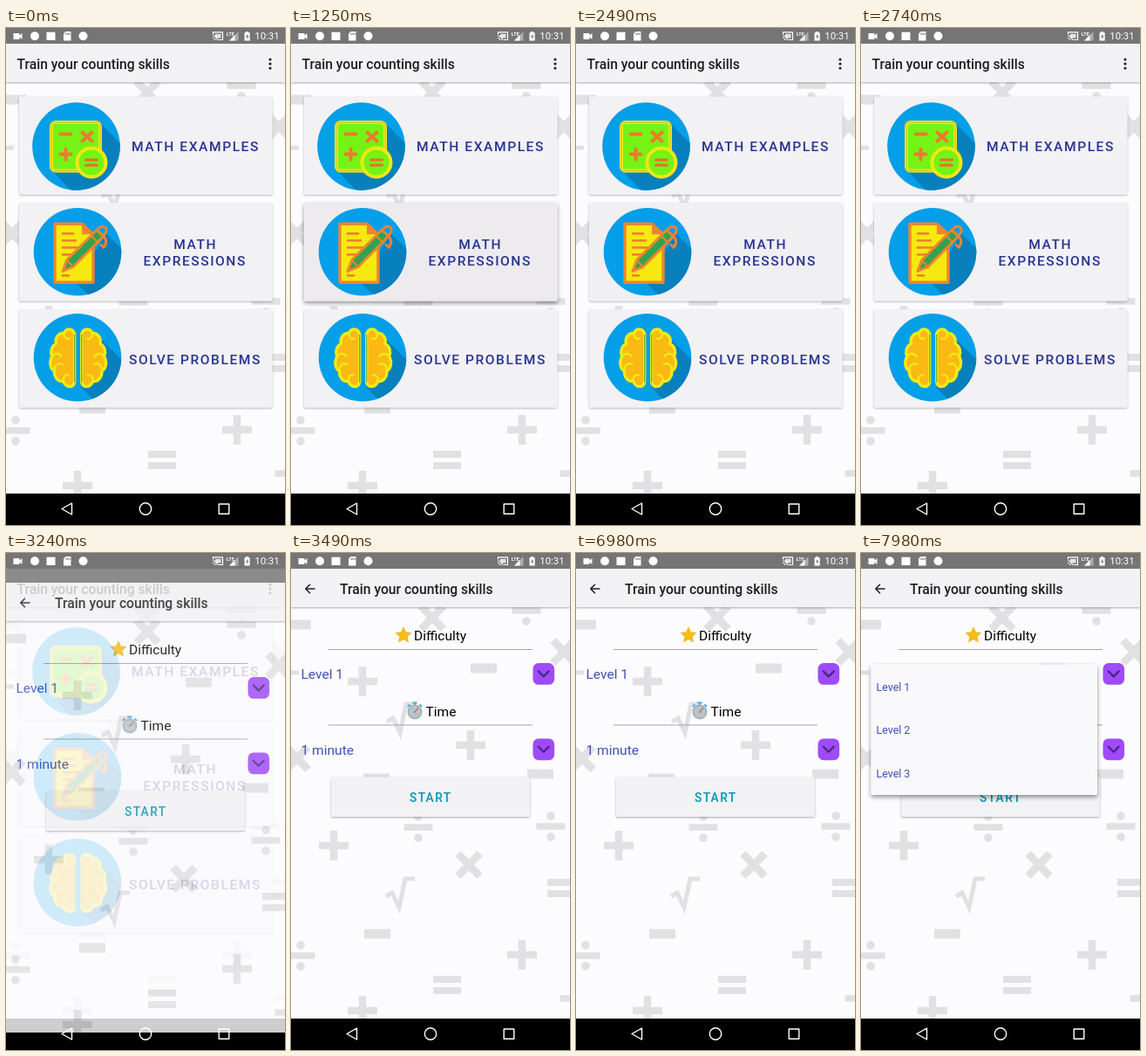
Recreate the animation shown at these times as an HTML page. Size 320x569 px, loop 8 s.

```html
<!DOCTYPE html>
<html lang="en">
<head>
<meta charset="utf-8">
<title>Counting skills</title>
<style>
html, body { margin: 0; width: 100%; height: 100%; overflow: hidden; background: #000; }
svg { display: block; width: 100%; height: 100%; }
text { font-family: Roboto, "Noto Sans", sans-serif; font-size: 15.56px; }
.title { font-weight: 500; font-size: 15.66px; fill: #1f1f1f; }
.caps { font-weight: 500; letter-spacing: .1em; fill: #283593; }
.start { font-weight: 500; font-size: 13.75px; letter-spacing: .1em; fill: #0095b6; }
.choice { fill: #3f51b5; }
.small { font-size: 12.45px; }
.line { stroke-linecap: round; stroke-linejoin: round; }
</style>
</head>
<body>
<svg id="stage" viewBox="0 0 320 569" preserveAspectRatio="none">
  <defs>
    <clipPath id="content"><rect y="18" width="320" height="515"/></clipPath>
    <filter id="low" x="-10%" y="-20%" width="120%" height="150%">
      <feDropShadow dx="0" dy="1" stdDeviation="1" flood-opacity=".32"/>
    </filter>
    <filter id="high" x="-10%" y="-20%" width="120%" height="150%">
      <feDropShadow dx="0" dy="2.5" stdDeviation="2.6" flood-opacity=".42"/>
    </filter>
    <clipPath id="disc"><circle r="50.3"/></clipPath>

    <g id="plus"><path d="M-17 0H17M0-17V17"/></g>
    <g id="minus"><path d="M-15 0H15"/></g>
    <g id="equals"><path d="M-16-6H16M-16 7H16"/></g>
    <g id="times"><path d="M-12.5-13L12.5 13M12.5-13L-12.5 13"/></g>
    <g id="divide"><path d="M-16.5 0H16.5"/><circle cy="-12" r="4.8" stroke="none"/><circle cy="12" r="4.8" stroke="none"/></g>
    <g id="root"><path d="M-17 3L-10-1L-2 16L5-17H16" fill="none"/></g>

    <g id="pattern" fill="#e1e0e2"></g>

    <rect id="bar" y="18" width="320" height="44" fill="#f2f1f3" filter="url(#low)"/>

    <g id="dropdown">
      <rect x="-12.2" y="-12.4" width="24.6" height="24.8" rx="6.5" fill="#9f4bfa"/>
      <path class="line" d="M-6-3L0 3L6-3" fill="none" stroke="#4b2388" stroke-width="2.3"/>
    </g>

    <g id="half" class="line" fill="none">
      <path d="M-4-27C-6-34-14-34-16-28C-23-28-27-22-25-16C-31-13-32-6-30-1C-34 6-31 14-27 15C-28 22-23 28-17 27C-14 35-5 35-4 28Z"
        fill="#fbb913" stroke="#f0ea16" stroke-width="3.4"/>
      <path d="M-16-28C-17-23-13-20-10-22M-30-1C-27-6-21-5-19-1M-27 15C-28 9-22 5-18 8M-17 27C-18 22-14 19-11 20"
        stroke="#f0ea16" stroke-width="2.2"/>
      <path d="M-4-26V28" stroke="#58ad45" stroke-width="1.2"/>
    </g>
  </defs>

  <rect width="320" height="569"/>

  <g id="menu" clip-path="url(#content)">
    <rect y="18" width="320" height="515" fill="#fcfbfd"/>
    <use href="#pattern"/>
    <use href="#bar"/>
    <text class="title" x="12.4" y="46.5">Train your counting skills</text>
    <g fill="#222"><circle cx="303" cy="36" r="1.6"/><circle cx="303" cy="41" r="1.6"/><circle cx="303" cy="46" r="1.6"/></g>

    <rect x="15" y="78.5" width="290.5" height="112" rx="1.5" fill="#f2f1f3" filter="url(#low)"/>
    <rect id="card" x="15" y="200" width="290.5" height="112.5" rx="1.5"/>
    <rect x="15" y="322" width="290.5" height="112.5" rx="1.5" fill="#f2f1f3" filter="url(#low)"/>

    <g transform="translate(80.5 135.5)">
      <circle r="50.3" fill="#049fe8"/>
      <path d="M27-27L70 16V70H12L-27 28Z" fill="#0880bd" clip-path="url(#disc)"/>
      <rect x="-28.5" y="-27.5" width="56" height="55.5" rx="5" fill="#75f314" stroke="#f1e712" stroke-width="4"/>
      <rect x="-28.5" y="-27.5" width="56" height="55.5" rx="5" fill="none" stroke="#c9bd32" stroke-width="1"/>
      <path class="line" d="M-18-14H-6M7-16L18-6M18-16L7-6M-18 9H-6M-12 3V15" stroke="#ee7a2e" stroke-width="4"/>
      <circle cx="17.5" cy="18.5" r="16.5" fill="#75f314" stroke="#f1e712" stroke-width="4"/>
      <path class="line" d="M11 15.5H24M11 21.5H24" stroke="#ee6c31" stroke-width="3"/>
    </g>

    <g transform="translate(82 256.3)">
      <circle r="50.3" fill="#049fe8"/>
      <path d="M33-21L75 21V70H33L-2 35Z" fill="#0880bd" clip-path="url(#disc)"/>
      <path class="line" d="M-26-32H5L18-20V35H-26Z" fill="#f5e90f" stroke="#ee8430" stroke-width="3.4"/>
      <path d="M5-32V-20H18Z" fill="#ee8430"/>
      <path class="line" d="M-17-21H-5M-17-13H-2M-17-5H5M-17 3H-4M-17 27H-10" stroke="#ee8430" stroke-width="2.7"/>
      <path class="line" d="M-17 22L-12 9L22-25L30-18L-5 17Z" fill="#31a34e" stroke="#ee8430" stroke-width="3"/>
      <path class="line" d="M22-25L27-29Q34-30 33-23L30-18M29-18Q36-13 30-5L27-8" fill="none" stroke="#ee8430" stroke-width="3"/>
      <path class="line" d="M-11 11L-7 15M16-18L23-11" stroke="#ee8430" stroke-width="2"/>
    </g>

    <g transform="translate(82 377.3)">
      <circle r="50.3" fill="#049fe8"/>
      <path d="M22-26L75 27V70H40L4 34Z" fill="#0880bd" clip-path="url(#disc)"/>
      <g transform="translate(.7 0)"><use href="#half"/><use href="#half" transform="scale(-1 1)"/></g>
    </g>

    <text class="caps" x="144" y="141">MATH EXAMPLES</text>
    <text class="caps" x="192.2" y="253">MATH</text>
    <text class="caps" x="157.4" y="271.5">EXPRESSIONS</text>
    <text class="caps" x="141" y="384.5">SOLVE PROBLEMS</text>
  </g>

  <g id="setup">
    <rect width="320" height="18" fill="#757575"/>
    <g clip-path="url(#content)">
      <rect y="18" width="320" height="515" fill="#fcfbfd"/>
      <use href="#pattern"/>
      <use href="#bar"/>
      <path class="line" d="M27 41H17M21.5 36.3L16.8 41L21.5 45.7" fill="none" stroke="#222" stroke-width="1.6"/>
      <text class="title" x="56" y="46.5">Train your counting skills</text>

      <path d="M43 110.5H277M43 197H277" stroke="#a5a4a6" stroke-width="1"/>
      <path id="star" fill="#f6bd16" stroke="#e9a916" stroke-width=".6" stroke-linejoin="round"/>
      <text x="141" y="100">Difficulty</text>
      <path class="line" d="M142 171.5V174M140 171.5H144M148 174L149.5 175.5M136 174L134.5 175.5" stroke="#4caedc" stroke-width="2"/>
      <circle cx="142" cy="182" r="7.6" fill="#b9c4c9" stroke="#a3b0b7" stroke-width="1.8"/>
      <path class="line" d="M142 182L145.5 178" stroke="#d56a4f" stroke-width="1.4"/>
      <circle cx="142" cy="182" r="1.3" fill="#8a979d"/>
      <text x="154.5" y="187">Time</text>
      <text class="choice" x="11.5" y="144">Level 1</text>
      <text class="choice" x="11.5" y="231">1 minute</text>
      <use href="#dropdown" x="289.7" y="138.4"/>
      <use href="#dropdown" x="289.7" y="224.8"/>

      <rect x="46" y="256.5" width="228" height="45.5" rx="1.5" fill="#f2f1f3" filter="url(#low)"/>
      <text class="start" x="136" y="285">START</text>

      <g id="popup">
        <rect x="11.5" y="127.5" width="259.5" height="149.5" rx="1.5" fill="#f9f8fa" filter="url(#high)"/>
        <text class="choice small" x="17.5" y="157.5">Level 1</text>
        <text class="choice small" x="17.5" y="207.3">Level 2</text>
        <text class="choice small" x="17.5" y="257">Level 3</text>
      </g>
    </g>
  </g>

  <g fill="#fff">
    <rect width="320" height="18" fill="#757575"/>
    <path d="M8.5 6H15.5V8.5L18.5 6V13L15.5 10.5V13H8.5Z"/>
    <circle cx="33" cy="9.3" r="5"/>
    <rect x="46.5" y="4.7" width="10" height="9.3"/>
    <path d="M68.5 4H74.5V14.5H66V6.5Z"/>
    <path d="M69 5.5V8M71 5.5V8M73 5.5V8" stroke="#757575" stroke-width="1"/>
    <circle cx="88.5" cy="9.3" r="5"/>
    <path class="line" d="M237.5 7V4.8H248.5V13.5H244M237.5 9Q242 9 242.3 13.5M237.5 11.5Q239.5 11.5 239.7 13.5" fill="none" stroke="#fff" stroke-width="1.2"/>
    <rect x="240" y="6.8" width="6.5" height="4.7" opacity=".8"/>
    <text x="252.8" y="8.6" style="font-size:5.5px;font-weight:700">LTE</text>
    <path d="M266.5 4V14.5H256Z" opacity=".4"/>
    <path d="M262.5 8V14.5H256Z"/>
    <path d="M273.5 5.2H275.2V4H278V5.2H279.7V14.5H273.5Z"/>
    <path d="M277.3 6.5L275 10.2H276.5V13L278.5 9.2H277Z" fill="#757575"/>
    <text x="285.3" y="13.4" style="font-size:11.4px">10:31</text>
  </g>

  <g class="line" fill="none" stroke="#fff" stroke-width="1.4">
    <path d="M75.5 544V557L64 550.5Z"/>
    <circle cx="160" cy="550.5" r="6.7"/>
    <rect x="244.2" y="545" width="11.6" height="11.3"/>
  </g>
</svg>
<script>
const LOOP = 8000;
const PRESS = 1250, RELEASE = 2240, IDLE = 2740, ENTER = 3240, SETTLED = 3490, OPEN = 7980;
const $ = id => document.getElementById(id);

const signs = {
  minus: { weight: 11, spots: [[8, 82], [221, 132], [286, 253], [98, 258], [99, 436]] },
  times: { weight: 9, spots: [[162, 74], [313, 113], [7, 235], [204, 357]] },
  divide: { weight: 7.5, spots: [[270, 66], [146, 314], [298, 313], [11, 461], [325, 510]] },
  root: { weight: 5, spots: [[-7, 154], [127, 190], [126, 390]] },
  plus: { weight: 8.5, spots: [[82, 147], [206, 220], [49, 335], [265, 460], [82, 524]] },
  equals: { weight: 8, spots: [[310, 383], [179, 494]] }
};
$("pattern").innerHTML = Object.entries(signs).map(([sign, { weight, spots }]) =>
  `<g stroke="#e1e0e2" stroke-width="${weight}">` +
  spots.map(([x, y]) => `<use href="#${sign}" x="${x}" y="${y}"/>`).join("") + "</g>"
).join("");

const star = Array.from({ length: 10 }, (_, i) => {
  const radius = i % 2 ? 4.5 : 9.3, angle = i * Math.PI / 5;
  return [129 + radius * Math.sin(angle), 94.3 - radius * Math.cos(angle)];
});
$("star").setAttribute("d", `M${star.join("L")}Z`);

const show = (id, visible) => $(id).setAttribute("display", visible ? "inline" : "none");

function render(t) {
  const pressed = t >= PRESS && t < RELEASE;
  const fading = t >= RELEASE && t < IDLE;
  const entering = t >= ENTER && t < SETTLED;

  $("card").setAttribute("fill", pressed ? "#edebed" : fading ? "#f0eff1" : "#f2f1f3");
  $("card").setAttribute("filter", pressed ? "url(#high)" : "url(#low)");

  show("menu", t < SETTLED);
  show("setup", t >= ENTER);
  show("popup", t >= OPEN);
  $("setup").setAttribute("opacity", entering ? .82 : 1);
  $("setup").setAttribute("transform", `translate(0 ${entering ? 16 : 0})`);
}

const begin = performance.now();
function tick() {
  render((performance.now() - begin) % LOOP);
  requestAnimationFrame(tick);
}
tick();
</script>
</body>
</html>
```
